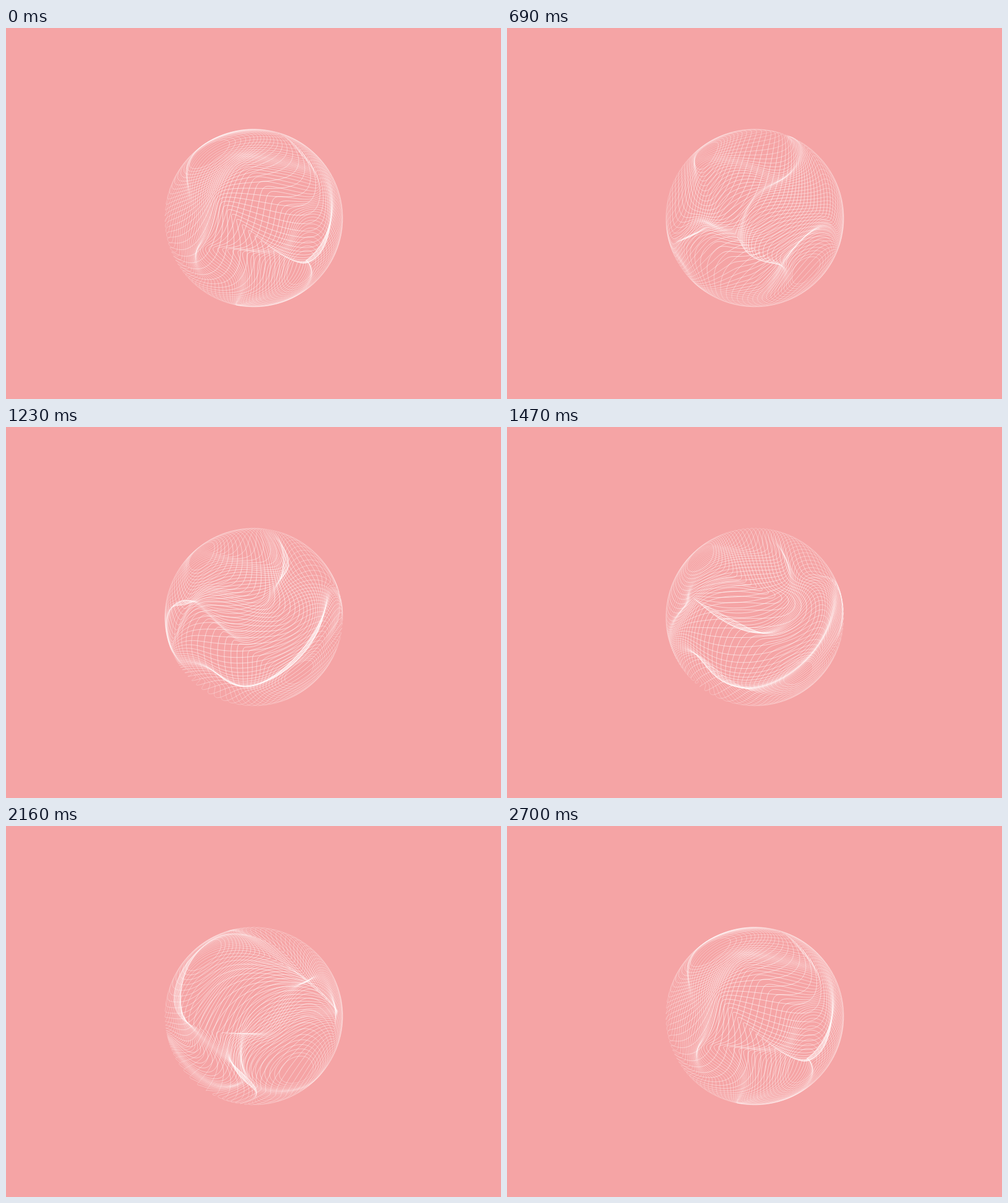
An HTML page with a canvas that plays this animation: 800x600 px, repeating every 2730 ms.

```html
<!DOCTYPE html>
<html lang="en">
<head>
<meta charset="utf-8">
<title>Wire sphere</title>
<style>
  html, body { margin: 0; width: 100%; height: 100%; overflow: hidden; background: #f5a4a5; }
  canvas { display: block; width: 800px; height: 600px; }
</style>
</head>
<body>
<canvas width="800" height="600"></canvas>
<script>
const ctx = document.querySelector('canvas').getContext('2d');
const TAU = 2 * Math.PI;
const LINES = 64, STEPS = 200, LEVELS = 8, WAVES = 8;
const RADIUS = 142, CX = 400.5, CY = 307.3, PERSPECTIVE = 0.15;
const HOLE = 0.22;         // angular radius of the openings at the poles
const WARP = 0.2;          // strength of the surface distortion
const FRAME = 30, FRAMES = 91;

// Orthonormal basis of the sphere, z pointing at the viewer.
const AXIS = [-0.585, -0.639, 0.5];
const U = [0.738, -0.675, 0];
const V = [0.3375, 0.369, 0.866];

let seed = 2718;
function random() {
  seed = (seed * 1664525 + 1013904223) % 4294967296;
  return seed / 4294967296;
}

function makeWave() {
  const z = random() * 2 - 1, angle = random() * TAU;
  const k = 3 + 3 * random(), flat = Math.sqrt(1 - z * z);
  return {
    x: k * flat * Math.cos(angle), y: k * flat * Math.sin(angle), z: k * z,
    phase: random() * TAU, drift: random() * TAU, now: 0
  };
}

// One smooth field for each component of the displacement.
const fields = [0, 1, 2].map(() => Array.from({ length: WAVES }, makeWave));

function sample(field, [x, y, z]) {
  let sum = 0;
  for (const w of field) sum += Math.sin(w.x * x + w.y * y + w.z * z + w.now);
  return sum * Math.sqrt(2 / WAVES);
}

function surfacePoint(polar, turn) {
  const s = Math.sin(polar), c = Math.cos(polar);
  const a = s * Math.cos(turn), b = s * Math.sin(turn);
  const p = AXIS.map((n, i) => n * c + U[i] * a + V[i] * b);
  const [x, y, z] = p.map((n, i) => n + WARP * s * sample(fields[i], p));
  const length = Math.hypot(x, y, z), depth = z / length;
  const scale = RADIUS / length / (1 - PERSPECTIVE * depth);
  return { x: CX + x * scale, y: CY + y * scale, depth: Math.abs(depth) };
}

function drawParallel(polar) {
  const paths = Array.from({ length: LEVELS }, () => new Path2D());
  let previous = surfacePoint(polar, 0), lastLevel = -1;
  for (let i = 1; i <= STEPS; i++) {
    const point = surfacePoint(polar, i / STEPS * TAU);
    const level = Math.min(LEVELS - 1, Math.floor(point.depth * LEVELS));
    if (level !== lastLevel) paths[level].moveTo(previous.x, previous.y);
    paths[level].lineTo(point.x, point.y);
    previous = point;
    lastLevel = level;
  }
  // The mesh fades towards the rim.
  paths.forEach((path, level) => {
    ctx.globalAlpha = 0.22 + 0.42 * (level + 0.5) / LEVELS;
    ctx.stroke(path);
  });
}

function draw(now) {
  const t = Math.floor(now / FRAME) % FRAMES / (FRAMES - 1);
  for (const w of fields.flat()) w.now = w.phase + 1.5 * Math.sin(TAU * t + w.drift);
  ctx.globalAlpha = 1;
  ctx.fillStyle = '#f5a4a5';
  ctx.fillRect(0, 0, 800, 600);
  ctx.strokeStyle = '#fff';
  ctx.lineWidth = 0.9;
  for (let i = 0; i < LINES; i++) {
    drawParallel(HOLE + (Math.PI - 2 * HOLE) * i / (LINES - 1));
  }
  requestAnimationFrame(draw);
}
requestAnimationFrame(draw);
</script>
</body>
</html>
```
